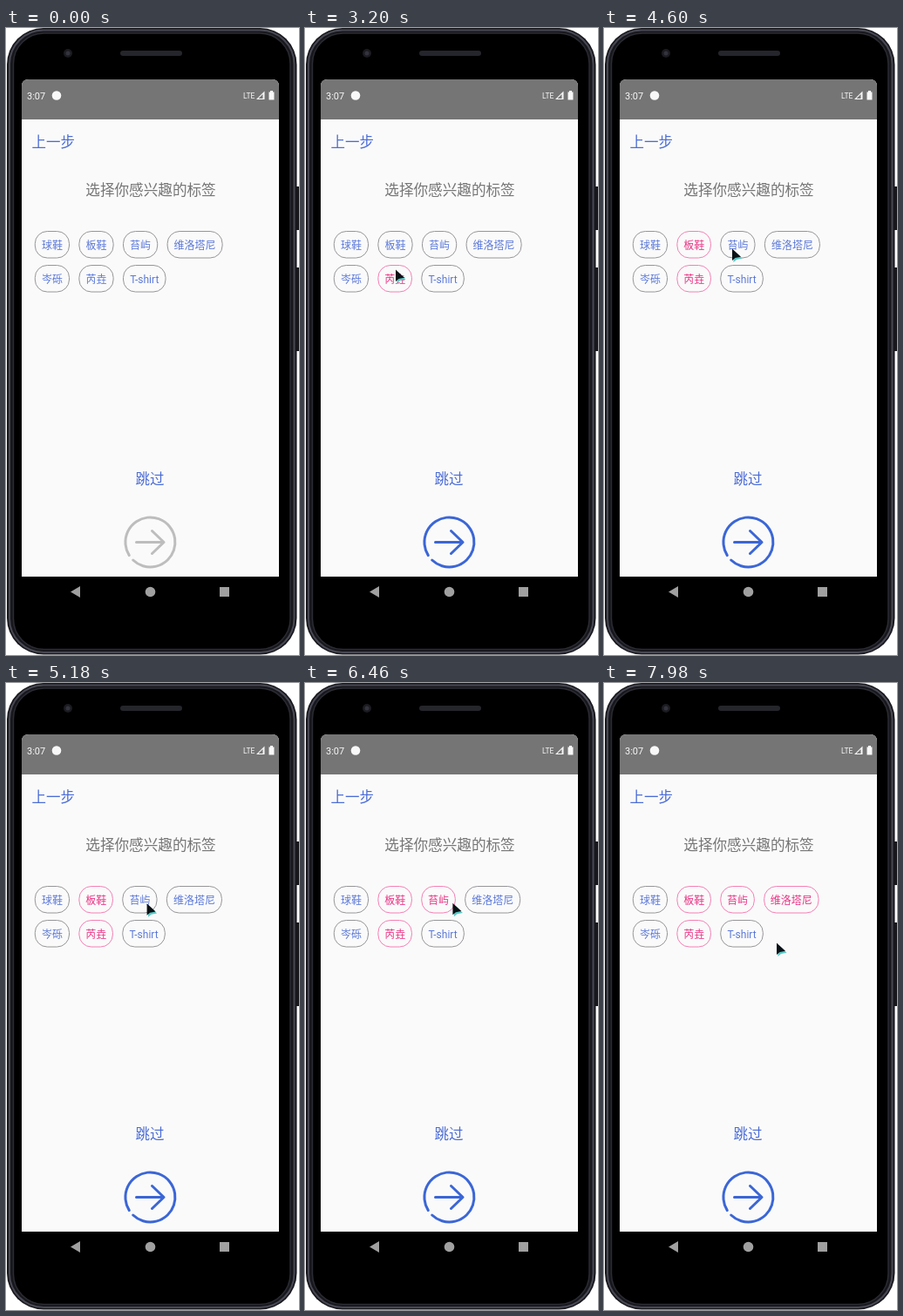
Recreate the animation shown at these times as an HTML page. Size 336x720 px, loop 8 s.

```html
<!DOCTYPE html>
<html lang="zh-CN">
<head>
<meta charset="utf-8">
<title>选择标签</title>
<style>
  html, body { margin: 0; width: 100%; height: 100%; overflow: hidden; background: #fff; }
  svg { display: block; width: 336px; height: 720px; }
  text { font-family: "Noto Sans CJK SC", "Noto Sans CJK", sans-serif; fill: #4b6cd6; }
  .latin { font-family: Roboto, sans-serif; }
  .status text { fill: #f8f8f8; }
  .tag rect { fill: none; stroke: #969699; stroke-width: 1; }
  .tag text { font-size: 12px; text-anchor: middle; fill: #5b78d8; }
  .tag.on rect { stroke: #f57fb4; }
  .tag.on text { fill: #ea3384; }
  #next { fill: none; stroke: #bdbdbd; stroke-width: 3; stroke-linecap: round; stroke-linejoin: round; }
  #next.on { stroke: #3b66d6; }
</style>
</head>
<body>
<svg viewBox="0 0 336 720">
  <path d="M331 182h5v50h-5zM331 275h5v96h-5z" fill="#17171c"/>
  <rect x="1" width="332.5" height="719.5" rx="42" fill="#17171c"/>
  <rect x="4" y="2.5" width="326.5" height="714.5" rx="39" fill="none" stroke="#484854" stroke-width="2"/>
  <rect x="8.5" y="6" width="317.5" height="707.5" rx="35" stroke="#2b2b34" stroke-width="1.5"/>
  <circle cx="71" cy="29" r="5" fill="#1b1b20"/>
  <circle cx="71" cy="29" r="2.5" fill="#33333d"/>
  <rect x="131" y="26" width="71" height="6" rx="3" fill="#25252c"/>

  <path d="M18 630V67q0-8 8-8h279q8 0 8 8v563z" fill="#fafafa"/>
  <path d="M18 105V67q0-8 8-8h279q8 0 8 8v38z" fill="#757575"/>

  <g class="status" fill="#f8f8f8">
    <text class="latin" x="24" y="81.5" font-size="11">3:07</text>
    <circle cx="58" cy="77.5" r="5.3"/>
    <text class="latin" x="272" y="81" font-size="8.5">LTE</text>
    <path d="M287 82l9.5-9.5V82z"/>
    <path d="M289.5 81l5-5v5z" fill="#757575"/>
    <path d="M301.5 73.5h1.5v-1.5h3v1.5h1.5v9h-6z"/>
  </g>

  <text x="29.5" y="137" font-size="16.5">上一步</text>
  <text x="166" y="192" font-size="16.6" text-anchor="middle" style="fill:#757575">选择你感兴趣的标签</text>
  <g id="tags"></g>
  <text x="165" y="523.5" font-size="16.5" text-anchor="middle">跳过</text>

  <g id="next">
    <path d="M145.7 611A28.5 28.5 0 1 0 141.3 605.6"/>
    <path d="M149.5 590.5h31.5M167.5 577.5l13.5 13-13.5 13"/>
  </g>

  <g fill="#a0a0a0">
    <path d="M74 647.5l11-6.5v13z"/>
    <circle cx="165.5" cy="647.5" r="5.8"/>
    <rect x="245" y="642" width="11" height="11"/>
  </g>

  <g id="cursor">
    <path d="M2.5 3.5v13.5l3.5-3 6.5-1.2z" fill="#58c9c6"/>
    <path d="M1 1.5v13.5l3.5-3 6.5-1.2z" fill="#0a1216"/>
  </g>
</svg>
<script>
const LOOP = 8000;
const NEVER = Infinity;
const FIRST_PICK = 3000;
const rows = [
  { y: 233.5, tags: [['球鞋', 39.2, NEVER], ['板鞋', 39.2, 4300], ['苔屿', 39.2, 6200], ['维洛塔尼', 63, 6950]] },
  { y: 272.5, tags: [['岑砾', 39.2, NEVER], ['芮垚', 39.2, FIRST_PICK], ['T-shirt', 48.5, NEVER]] }
];
// Pointer path: time, x, y
const path = [
  [2520, 186, 300], [2900, 120, 285], [3200, 103, 276], [3340, 103, 277],
  [3700, 172, 286], [4080, 116, 256], [4250, 103, 249], [4380, 108, 248],
  [4600, 146, 252], [5020, 150, 250], [5400, 175, 254], [5760, 164, 246],
  [5860, 163, 245], [6200, 156, 250], [6600, 175, 252], [6900, 205, 252],
  [7300, 211, 251], [7540, 223, 245], [7980, 197, 297], [LOOP, 197, 297]
];

const byId = id => document.getElementById(id);
const make = (name, parent, attrs = {}) => {
  const el = document.createElementNS('http://www.w3.org/2000/svg', name);
  for (const key in attrs) el.setAttribute(key, attrs[key]);
  return parent.appendChild(el);
};

for (const row of rows) {
  row.tags = row.tags.map(([label, width, pickAt]) => {
    const group = make('g', byId('tags'), { class: 'tag' });
    const box = make('rect', group, { y: row.y, height: 30.5, rx: 14 });
    const text = make('text', group, { y: row.y + 20 });
    text.textContent = label;
    if (label === 'T-shirt') text.classList.add('latin');
    return { group, box, text, width, pickAt };
  });
}

function layoutRow(row, t) {
  let x = 33.3;
  for (const tag of row.tags) {
    const on = t >= tag.pickAt;
    const width = tag.width - (on ? 0.7 : 0);
    tag.group.classList.toggle('on', on);
    tag.box.setAttribute('x', x);
    tag.box.setAttribute('width', width);
    tag.text.setAttribute('x', x + width / 2);
    x += width + 11.4;
  }
}

function placeCursor(t) {
  const cursor = byId('cursor');
  const i = path.findIndex(point => point[0] > t);
  cursor.style.display = i > 0 ? '' : 'none';
  if (i < 1) return;
  const [t0, x0, y0] = path[i - 1], [t1, x1, y1] = path[i];
  const k = (t - t0) / (t1 - t0);
  cursor.setAttribute('transform', `translate(${x0 + (x1 - x0) * k} ${y0 + (y1 - y0) * k})`);
}

function draw() {
  const t = performance.now() % LOOP;
  rows.forEach(row => layoutRow(row, t));
  byId('next').classList.toggle('on', t >= FIRST_PICK);
  placeCursor(t);
  requestAnimationFrame(draw);
}
draw();
</script>
</body>
</html>
```
